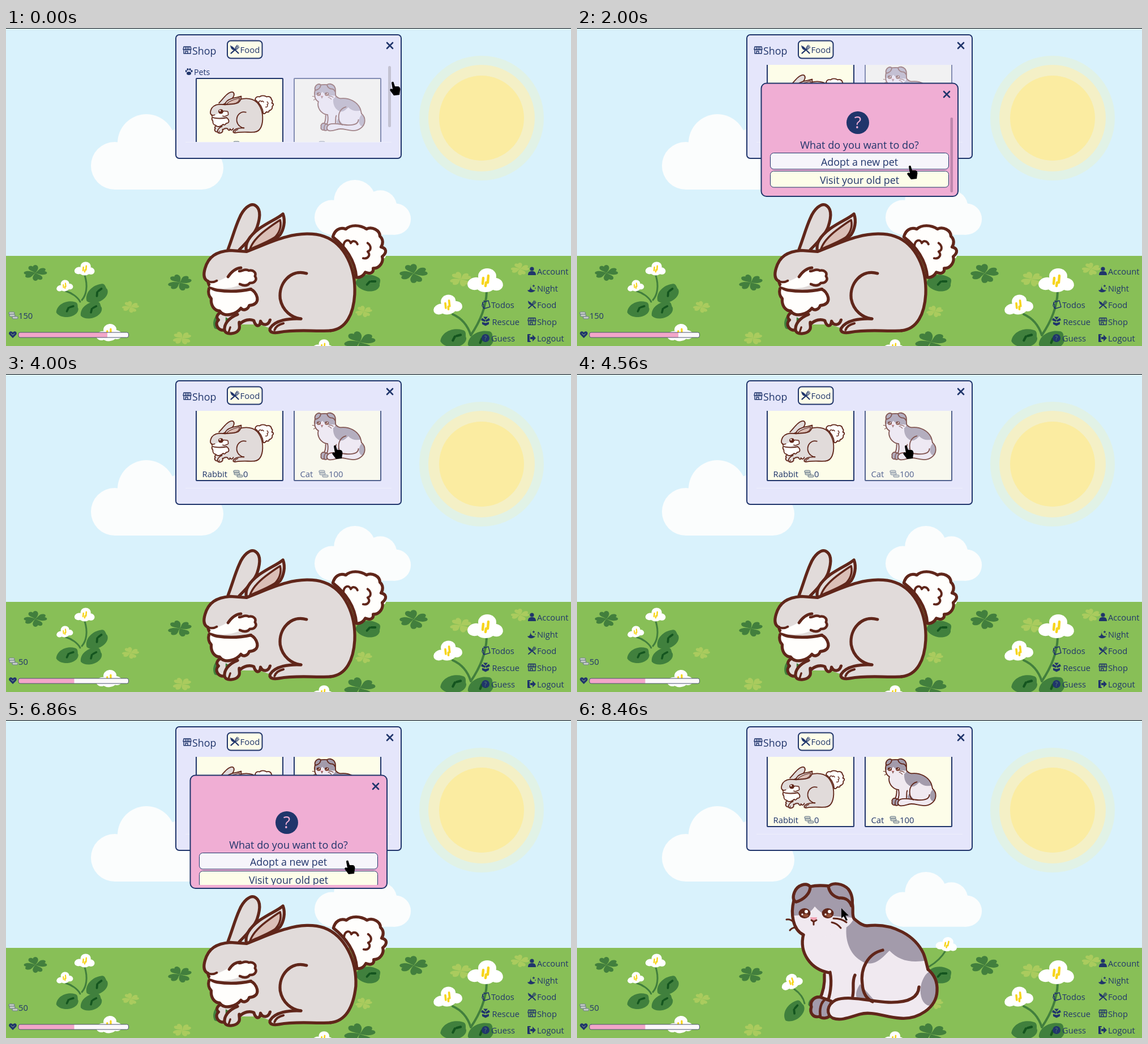
Write an HTML page with a canvas that moves like this. It is 998 px wide and 561 px high and loops after 8.48 s.

```html
<!DOCTYPE html>
<html lang="en">
<head>
<meta charset="utf-8">
<title>Virtual pet shop</title>
<style>
html, body { margin: 0; width: 100%; height: 100%; overflow: hidden; background: #d9f2fc; }
canvas { display: block; }
</style>
</head>
<body>
<canvas id="stage" width="998" height="561"></canvas>
<script>
const LOOP = 8480, W = 998, H = 561;
const NAVY = '#20356b', CREAM = '#fdfde9', PANEL = '#e5e6fb', BROWN = '#60261a';
const FUR = '#e1dbda', WHITE = '#fffefc', GREY = '#a39bab', CATFUR = '#f0e9f0';
const FONT = '"Open Sans", "Noto Sans", sans-serif';
const canvas = document.getElementById('stage');
let g = canvas.getContext('2d');

const clamp = (v, a = 0, b = 1) => Math.min(b, Math.max(a, v));
const ease = v => { v = clamp(v); return v * v * (3 - 2 * v); };
const ramp = (t, a, b) => ease((t - a) / (b - a));
const within = (t, a, b) => t >= a && t < b;

function fill(d, color) { g.fillStyle = color; g.fill(new Path2D(d)); }
function line(d, color = BROWN, width = 5.3) {
  g.strokeStyle = color; g.lineWidth = width; g.lineCap = g.lineJoin = 'round';
  g.stroke(new Path2D(d));
}
function shape(d, color, width) { fill(d, color); line(d, BROWN, width); }
function disc(x, y, rx, color, ry = rx, rot = 0) {
  g.fillStyle = color; g.beginPath(); g.ellipse(x, y, rx, ry, rot, 0, 7); g.fill();
}
function box(x, y, w, h, r, color, border, width = 2) {
  g.beginPath(); g.roundRect(x, y, w, h, r);
  if (color) { g.fillStyle = color; g.fill(); }
  if (border) { g.strokeStyle = border; g.lineWidth = width; g.stroke(); }
}
function text(s, x, y, size, align = 'left', color = NAVY) {
  g.font = `${size}px ${FONT}`; g.textAlign = align; g.fillStyle = color; g.fillText(s, x, y);
}
function at(x, y, scale, draw, rot = 0) {
  g.save(); g.translate(x, y); g.rotate(rot); g.scale(scale, scale); draw(); g.restore();
}
function clip(x, y, w, h, draw) {
  g.save(); g.beginPath(); g.rect(x, y, w, h); g.clip(); draw(); g.restore();
}

// Scenery
function cloud(x, y, s) {
  at(x, y, s, () => {
    for (const [cx, cy, r] of [[42, 91, 42], [98, 51, 51], [160, 65, 40], [196, 95, 38]]) disc(cx, cy, r, '#fbfdfd');
    box(42, 70, 154, 63, 0, '#fbfdfd');
  });
}
function clover(x, y, s, color, rot = 0) {
  g.save(); g.translate(x, y); g.scale(s, s * 0.68); g.rotate(rot);
  for (let i = 0; i < 4; i++) {
    fill('M0 0C3 -8 1 -17 10 -18C14 -18 15 -14 14 -11C20 -12 22 -6 18 -3C14 1 7 1 0 0Z', color);
    g.rotate(Math.PI / 2);
  }
  g.restore();
}
function flower(x, y, s, rot = 0) {
  at(x, y, s, () => {
    disc(-18, 5, 14, '#fff', 11, -0.2);
    disc(18, 6, 13, '#fff', 11, 0.3);
    disc(3, -8, 16, '#fff', 14);
    disc(0, 9, 17, '#fff', 11);
    line('M-4 -5L-5 5M5 -9L4 3M1 3L0 9', '#f7d51d', 4.5);
  }, rot);
}
function leaf(x, y, s, rot) {
  at(x, y, s, () => {
    fill('M-22 2C-18 -14 2 -19 17 -13C25 -10 20 -3 22 1C21 13 3 17 -8 13C-15 11 -20 7 -22 2Z', '#40803d');
    line('M-1 3L3 -3M6 -4L13 -5', '#14551f', 4);
  }, rot);
}
function scenery() {
  g.fillStyle = '#d9f2fc'; g.fillRect(0, 0, W, H);
  disc(840, 159, 110, '#e1f2e6');
  disc(840, 159, 94, '#f4f0c6');
  disc(840, 159, 75, '#fbeca1');
  cloud(150, 152, 1);
  cloud(545, 268, 0.727);
  g.fillStyle = '#88bf57'; g.fillRect(0, 402, W, H);
  const dark = '#427f3d', light = '#aacb5e';
  for (const [x, y, s, r] of [[52, 432, 0.95, 0.4], [307, 449, 1, 0.1], [720, 433, 1.15, 0.4], [625, 554, 1.3, 0.2]])
    clover(x, y, s, dark, r);
  for (const [x, y, s, r] of [[220, 492, 0.7, 0.3], [311, 547, 0.8, 0], [632, 500, 0.7, 0.2], [803, 443, 0.9, 0.1], [908, 425, 0.75, 0.4]])
    clover(x, y, s, light, r);
  line('M139 436C145 455 142 471 134 480M105 464C116 467 127 475 131 483', dark, 3);
  line('M849 465C848 495 836 520 821 542M789 505C805 512 816 526 821 542', dark, 4);
  line('M651 407C644 419 634 428 622 435M384 475C394 482 400 490 402 500', dark, 3);
  leaf(160, 470, 0.95, -0.5); leaf(108, 497, 0.9, -0.15); leaf(150, 499, 0.9, -0.35);
  leaf(790, 548, 1.05, -0.1); leaf(838, 552, 1.05, -0.2);
  leaf(639, 450, 0.98, 0.15); leaf(383, 515, 0.95, -0.7); leaf(423, 498, 0.7, -0.2);
  flower(139, 425, 0.57); flower(103.5, 455, 0.47, -0.2); flower(182, 538, 0.72, -0.1);
  flower(847, 446, 1); flower(780, 489, 0.82, -0.2); flower(653, 396, 0.6, 0.1);
  flower(379, 462, 0.62, -0.4); flower(560, 562, 0.58);
}

// Pets, drawn in stage coordinates
function turned(x, y, angle, draw) { at(x, y, 1, () => { g.translate(-x, -y); draw(); }, angle); }

function rabbit(b, mini) {
  g.save();
  g.translate(510, 423); g.scale(0.99, 0.99); g.translate(-510, -423);
  g.save(); g.translate(b, -1.5 * b);
  shape('M578 368C581 356 590 350 601 354C610 346 626 346 638 354C648 349 662 356 662 367C668 372 668 380 664 386C674 388 675 396 666 403C669 412 662 424 650 424C651 431 646 435 636 431C632 438 626 441 620 440C618 410 600 385 578 368Z', WHITE);
  line('M597 384C598 373 607 371 610 379C614 373 620 376 622 381M640 379C647 384 647 392 640 394C646 400 641 408 632 406', BROWN, 4);
  g.restore();
  turned(402, 391, mini ? 0.4 : 0, () => {
    shape('M391 390C398 372 404 350 411 335C418 318 430 308 438 311C451 317 448 335 443 350C439 362 424 378 411 391', FUR);
  });
  const back = `M355 447C347 443 347 434 350 424C356 403 370 394 395 392L424 394C455 382 475 373 495 368C520 ${361 - b} 545 ${361 - b} 562 ${367 - b}C600 380 ${619 + 2 * b} 425 ${617 + 2 * b} 470C615 505 602 532 574 535`;
  fill(back + 'L480 536L447 524L411 524L385 510L358 478Z', FUR);
  line(back);
  turned(424, 394, mini ? 0.32 : 0, () => {
    shape('M424 394C420 380 428 367 447 353C464 341 480 335 489 327C494 340 490 355 484 364C470 378 445 385 424 394Z', FUR);
    shape('M430 390C434 378 445 366 458 356C470 347 479 341 484 338C487 350 482 362 474 369C460 378 445 383 430 390Z', '#dbbfb7', 3.5);
  });
  line('M531 433C503 425 481 450 484 478C488 500 505 512 521 514');
  shape('M521 514C500 513 475 516 466 531C464 538 472 540 482 538C515 532 545 537 574 535', FUR);
  line('M490 522C481 524 476 528 474 534', BROWN, 4);
  line('M411 524C420 515 430 514 437 517C440 528 448 530 449 518C453 527 463 526 466 516');
  shape('M387 502C372 501 368 511 374 516C366 523 373 536 386 534', FUR);
  shape('M408 506C392 512 383 524 385 535C388 543 404 541 409 535C414 530 410 526 411 520', FUR);
  line('M395 529L392 538', BROWN, 3.5);
  shape('M357 460C355 467 357 474 361 478C360 490 366 499 376 500C380 506 388 508 396 506C404 504 410 500 414 495C418 500 426 498 429 490C436 490 445 486 443 476C441 468 436 463 431 461', WHITE);
  shape('M355 447C357 456 360 461 372 463C392 466 414 465 432 461', FUR);
  fill('M362 450C380 446 395 436 408 427C416 427 422 424 428 428C436 426 442 432 439 438C444 444 438 451 430 450C425 456 418 455 412 453C395 462 370 461 358 456Z', WHITE);
  line('M411 429C416 429 422 424 428 428C436 426 442 432 439 438C444 444 438 451 430 450C425 456 418 455 412 452', BROWN, 4.5);
  line('M355 447C360 449 366 449 371 446', BROWN, 4);
  if (mini) {
    disc(402, 429, 13, BROWN, 12);
    disc(398, 425, 4, '#fff');
  } else {
    line(`M${391 + 2 * b} ${439 + b}C${397 + 2 * b} ${430 + b} 404 ${424 + 4 * b} ${414 - b} ${423 + 4 * b}`, BROWN, 5);
  }
  g.restore();
}

function cat() {
  const body = 'M400 378C392 410 412 440 446 446L450 490L520 500L580 500C620 490 625 440 612 412C598 382 560 358 512 363C500 360 495 353 488 349Z';
  fill(body, CATFUR);
  g.save(); g.clip(new Path2D(body));
  fill('M480 345C470 375 475 415 510 429C530 433 542 416 552 407C570 425 590 430 625 423L600 340Z', GREY);
  fill('M500 466C490 480 490 495 505 500L530 500Z', GREY);
  g.restore();
  fill('M437 446C437 465 432 485 425 494L440 500L454 494L490 490L500 440Z', CATFUR);
  line('M400 378C392 410 412 440 446 446M437 449C438 465 434 482 428 494M447 445C451 465 447 488 441 500M491 450C485 462 490 472 487 487');
  shape('M430 489C418 487 411 498 414 506C410 517 418 526 428 523C434 528 444 526 448 520L449 496Z', GREY);
  line('M440 492C430 497 428 512 430 523', BROWN, 4.5);
  const tail = 'M620 440C632 450 637 462 636 478C635 508 602 529 570 526C545 524 520 513 500 519C480 525 466 531 452 526C440 520 440 503 457 494C480 485 520 497 550 498C585 499 603 490 604 471';
  fill(tail, CATFUR);
  g.save(); g.clip(new Path2D(tail));
  disc(626, 473, 19, GREY, 31, 0.15);
  g.restore();
  line(tail);
  line('M488 350C495 354 500 362 512 363C560 357 598 382 612 412C617 425 618 434 620 440M540 406C514 412 500 438 504 466C505 482 512 492 522 497');
  const head = 'M411 294C425 291 435 292 446 293L486 322C489 334 485 342 489 350C481 372 432 391 400 379C384 369 377 348 383 318Z';
  fill(head, CATFUR);
  g.save(); g.clip(new Path2D(head));
  fill('M370 285H500V352C480 346 460 348 446 345C434 343 426 336 420 329C414 338 405 346 375 345Z', GREY);
  g.restore();
  line('M411 294C425 291 435 292 446 293M383 318C377 342 381 370 400 379M486 322C489 334 485 342 489 350');
  shape('M412 294C405 286 389 291 384 304C381 312 381 318 387 321C400 317 412 307 412 294Z', GREY);
  shape('M444 294C452 285 470 289 479 298C486 307 488 319 485 328C481 318 475 313 463 314C452 311 446 304 444 294Z', GREY);
  for (const x of [402, 443]) {
    disc(x, 341, 10.5, BROWN, 9);
    disc(x + 2, 345, 5, '#965038', 3);
    disc(x + 3, 338, 3, '#fff');
    disc(x - 4, 343, 1.7, '#fff');
  }
  fill('M412 348H424C423 353 420 355 418 355C415 355 412 352 412 348Z', '#f1a3b4');
  line('M418 355V361M414 353L418 356L423 353M370 352C375 351 379 353 382 356M376 371C379 367 382 366 387 366M453 350C463 350 470 352 476 357M450 357C456 358 462 362 466 367', BROWN, 3);
}

// Icons, centred on their origin
const icons = {
  user() { disc(0, -4, 3.6, NAVY); fill('M-7 7C-7 1 -4 0 0 0S7 1 7 7Z', NAVY); },
  moon() { fill('M-1 -8C-5 -1 0 5 6 4C3 9 -6 9 -8 4C-1 5 -4 -4 -1 -8Z', NAVY); line('M3 -5V-2M1.5 -3.5H4.5M6 0V1', NAVY, 1.3); },
  food() {
    line('M-4 -4L6 6M2 -1L-6 6', NAVY, 1.9);
    line('M4 -7L1 -3C1 -1 2 0 4 -1L7 -4M6 -6L3 -3', NAVY, 1.2);
    fill('M-7 -7C-7 -3 -5 1 -1 1L0 -1Z', NAVY);
  },
  shop() {
    line('M-6 0V6H6V0M-6 -6H6L7 -1H-7ZM-3 -6V0M0 -6V0M3 -6V0M-3 6V2H1V6', NAVY, 1.4);
  },
  exit() { line('M-2 -6H-6V6H-2', NAVY, 2); fill('M-2 -2H2V-6L8 0L2 6V2H-2Z', NAVY); fill('M-7 -6L-3 -4V7L-7 6Z', NAVY); },
  todo() { line('M-6 -4L4 -7L7 4L-3 7ZM-6 -4L-7 2L-4 7M-1 -5L-4 -7', NAVY, 1.4); },
  rescue() { fill('M0 -2L-6 -6L-8 -2L-1 1ZM0 -2L6 -6L8 -2L1 1ZM-6 1L0 3L6 1V5L0 8L-6 5ZM-4 -8H4L0 -3Z', NAVY); },
  guess() { disc(0, 0, 7, NAVY); text('?', 0, 4, 10, 'center', '#5b8f70'); },
  coins() {
    for (const [x, y] of [[-3, -4], [-2, 0], [3, 4]]) box(x - 5, y - 2, 10, 4, 2, '#c8cec7', '#71808f', 1.2);
  },
  heart() { fill('M0 6L-6 0C-9 -5 -3 -8 0 -4C3 -8 9 -5 6 0Z', NAVY); line('M-3 -2L0 1L3 -2', '#8cb184', 1); },
  paw() {
    disc(0, 3, 4, NAVY, 3);
    for (const [x, y] of [[-5, -1], [-2, -4], [2, -4], [5, -1]]) disc(x, y, 1.6, NAVY, 2);
  },
  close() { line('M-5 -5L5 5M5 -5L-5 5', NAVY, 2.6); }
};
const icon = (name, x, y, s = 1) => at(x, y, s, icons[name]);

function hud(coins, health) {
  const menu = [
    ['user', 'Account', 929, 435], ['moon', 'Night', 929, 464.5], ['food', 'Food', 929, 494],
    ['shop', 'Shop', 929, 523.5], ['exit', 'Logout', 928, 553],
    ['todo', 'Todos', 848, 494], ['rescue', 'Rescue', 847, 523.5], ['guess', 'Guess', 847, 553]
  ];
  for (const [name, label, x, y] of menu) {
    icon(name, x, y - 6);
    text(label, x > 900 ? 938 : label === 'Rescue' ? 858.5 : 857, y, 14.7);
  }
  icon('coins', 13, 507);
  text(coins, 22, 512.5, 14.7);
  icon('heart', 12, 541);
  box(22, 537, 194.5, 9, 3, '#fbf9fa');
  box(22, 537, health, 9, [3, 0, 0, 3], '#f3a6c9');
  box(22, 537, 194.5, 9, 3, null, '#4b5370', 1);
}

function card(x, y, name, price, opacity, draw) {
  box(x, y, 153, 129, 1, CREAM, NAVY);
  draw();
  text(name, x + 10.5, y + 123, 14.8);
  const cx = x + (name === 'Cat' ? 52 : 74);
  icon('coins', cx, y + 117);
  text(price, cx + 9, y + 123, 14.8);
  if (opacity < 1) {
    g.globalAlpha = 1 - opacity;
    g.fillStyle = PANEL; g.fillRect(x - 2, y - 2, 157, 133);
    g.globalAlpha = 1;
  }
}

function panel(scroll, bar, catOpacity) {
  box(300, 12, 398, 218, 6, PANEL, NAVY);
  icon('shop', 320, 39);
  text('Shop', 329, 46.5, 17.8);
  box(391, 22.5, 61.5, 31, 6, CREAM, NAVY);
  icon('food', 404, 38, 1.1);
  text('Food', 413.5, 44, 14.9);
  icon('close', 678, 31);
  g.fillStyle = '#eeeffc'; g.fillRect(317, 201, 364, 1);
  clip(317, 65, 364, 136, () => {
    icon('paw', 323, 77 - scroll);
    text('Pets', 332, 83 - scroll, 14.2);
    const y = 89 - scroll, k = 0.347;
    card(336, y, 'Rabbit', '0', 1, () =>
      at(360 - 347 * k, y + 97.5 - 542 * k, k, () => rabbit(0, true)));
    card(509, y, 'Cat', '100', catOpacity, () =>
      at(541 - 369 * k, y + 9 - 287 * k, k, cat));
  });
  if (bar > 0) {
    g.globalAlpha = bar;
    box(675, 67 + scroll * 0.82, 5, 108, 2.5, '#c3c2d2');
    g.globalAlpha = 1;
  }
}

function dialog(show, scroll, x, y) {
  g.save();
  g.globalAlpha = show;
  g.translate(499, 197); g.scale(0.85 + 0.15 * show, 0.85 + 0.15 * show); g.translate(-499, -197);
  box(325.5, 97.5, 347.5, 199.5, 9, '#f0aed4', NAVY);
  icon('close', 653, 117);
  clip(327, 130, 345, 161, () => {
    disc(496, 181 - scroll, 20, NAVY);
    text('?', 496, 191 - scroll, 29, 'center', '#f0aed4');
    text('What do you want to do?', 499, 227 - scroll, 18.1, 'center');
    ['Adopt a new pet', 'Visit your old pet'].forEach((label, i) => {
      const top = 234.5 + 32 * i - scroll;
      const hover = within(x, 341, 657) && within(y, top, top + 29);
      box(341.5, top, 315, 28.5, 6, hover ? '#f6f5fb' : CREAM, NAVY, 1);
      text(label, 499, top + 22, 17.9, 'center');
    });
    if (scroll) box(659.5, 144 + scroll, 4.5, 132, 2, '#bd86ac');
  });
  g.restore();
}

// Pointer stops: time, x, y of the tip
const stops = [
  [0, 684, 95], [200, 684, 95], [700, 684, 120], [1000, 684, 120], [1500, 440, 150], [1760, 440, 150],
  [1950, 589, 243], [2100, 589, 243], [2700, 645, 170], [3400, 645, 170], [3700, 582, 126],
  [4560, 582, 126], [5300, 646, 139], [5660, 646, 139], [6150, 600, 120], [6350, 600, 120],
  [6800, 604, 248], [7150, 604, 248], [7700, 480, 300], [8300, 467, 332], [LOOP, 467, 332]
];
function pointer(t) {
  const i = stops.findIndex(s => s[0] > t);
  const [t0, x0, y0] = stops[i - 1], [t1, x1, y1] = stops[i];
  const k = ramp(t, t0, t1);
  return [x0 + (x1 - x0) * k, y0 + (y1 - y0) * k];
}
function drawPointer(x, y, arrow) {
  at(x, y, 1, () => fill(arrow
    ? 'M0 0V18L4 14L8 22L11 21L7 13H13Z'
    : 'M-3 2C-3 -1 1 -1 1 2L3 8L9 8C12 9 13 12 12 16L11 23L1 24L-5 16C-7 13 -4 11 -1 13Z', '#000'));
}

const backdrop = document.createElement('canvas');
backdrop.width = W; backdrop.height = H;
const front = g;
g = backdrop.getContext('2d');
scenery();
g = front;

function frame(t) {
  g.drawImage(backdrop, 0, 0);
  const breath = ease((Math.cos(2 * Math.PI * (t - 1120) / 2000) + 0.1) / 0.75);
  if (t < 7800) rabbit(breath, false); else cat();
  hud(t < 3700 ? '150' : '50', t < 2200 ? 157 : 98.5);
  const bar = 1 - ramp(t, 1000, 1200) + ramp(t, 5200, 5350) - ramp(t, 6000, 6200);
  panel(30 * ramp(t, 200, 700), bar, t < 3700 ? 0.5 : t < 6350 ? 0.75 : 1);
  const [x, y] = pointer(t);
  if (within(t, 1760, 2200)) dialog(ramp(t, 1760, 1880), 14 * ramp(t, 1850, 1960), x, y);
  if (within(t, 6350, 7250)) dialog(ramp(t, 6350, 6500), 0, x, y);
  drawPointer(x, y, t >= 7500);
  g.fillStyle = '#000'; g.fillRect(0, 0, W, 1);
}

const start = performance.now();
function tick() {
  frame((performance.now() - start) % LOOP);
  requestAnimationFrame(tick);
}
tick();
</script>
</body>
</html>
```
